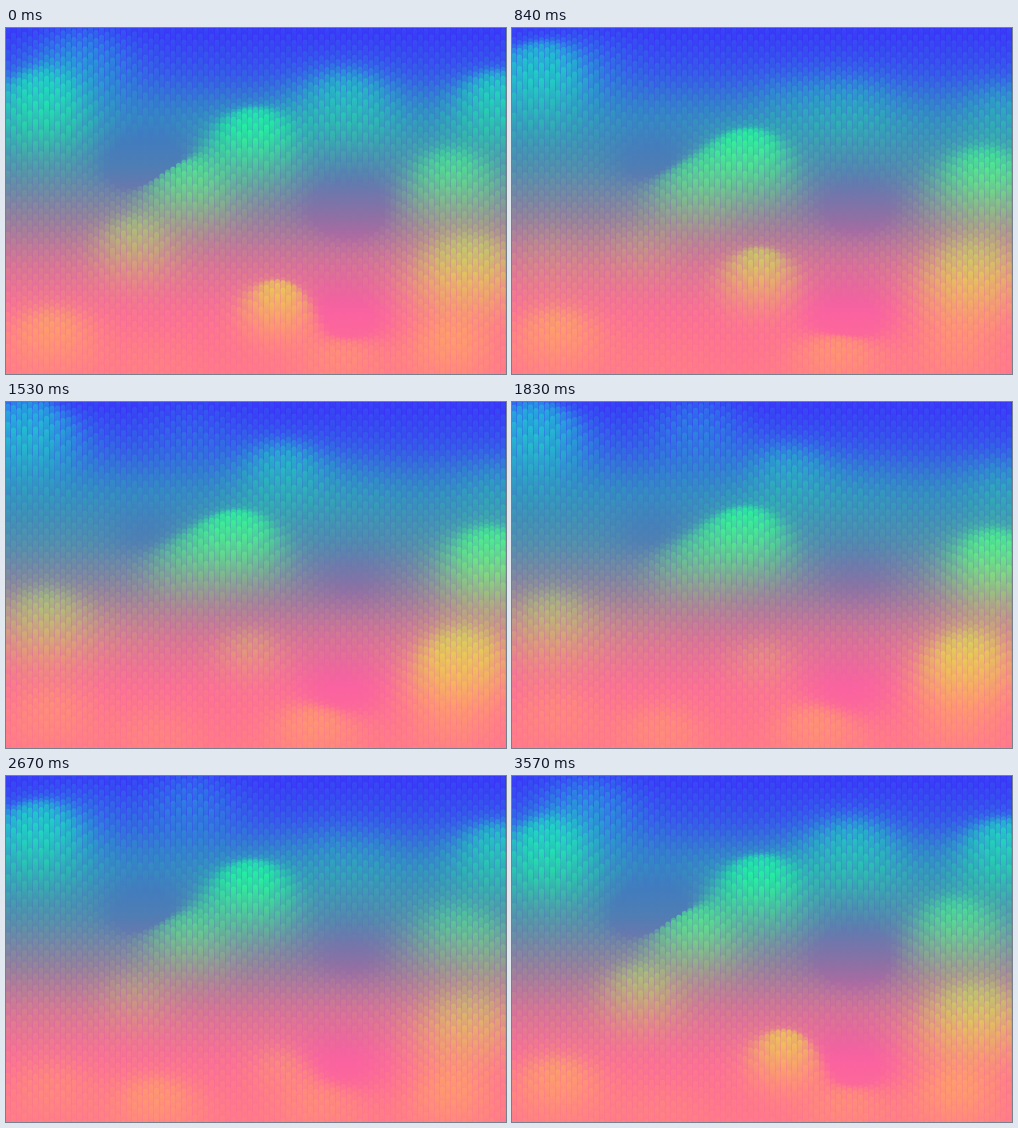
Animation, 500 px wide and 346 px high, one loop 3600 ms. Source, as an HTML page with a canvas:

```html
<!DOCTYPE html>
<html lang="en">
<head>
<meta charset="utf-8">
<title>Rolling pillars</title>
<style>
html, body { margin: 0; width: 100%; height: 100%; overflow: hidden; background: #3c28fa; }
canvas { display: block; width: 500px; height: 346px; }
</style>
</head>
<body>
<canvas id="stage" width="500" height="346"></canvas>
<script>
const W = 500, H = 346, LOOP = 3600, STEP = 30;
const COL = 5.5, ROW = 6, LIFT = 47, TAU = Math.PI * 2;
const ctx = document.getElementById('stage').getContext('2d');

// Hills and hollows: x, y, radius, strength, peak time, fade, drift x, drift y
const waves = [
  [28, 80, 42, 1.1, .7, 0, 8, 24],
  [75, 52, 50, .45, 0, 1],
  [241, 149, 38, 1.1, .15, 0, -8, 16],
  [184, 181, 42, .8, .02, .3],
  [130, 236, 38, .6, .97, 1],
  [492, 97, 42, 1, .9, .9],
  [462, 175, 45, .85, .15, .4, 20, 0],
  [340, 96, 50, .6, .03, 1],
  [275, 87, 42, .5, .42, 2],
  [185, 42, 45, .55, .62, 2],
  [262, 287, 33, 1.2, .1, 1, -20, -25],
  [462, 267, 52, .9, .05, .4],
  [452, 298, 40, 1, .45, 1.5],
  [487, 196, 40, .9, .48, 1.5],
  [40, 242, 48, .65, .44, 2],
  [45, 331, 45, .6, .12, .5],
  [320, 348, 45, .5, .3, .2, -15, 0],
  [150, 352, 45, .55, .68, 1],
  [445, 346, 42, .6, .9, .4],
  [140, 137, 40, -.6, .95, .6],
  [345, 178, 45, -.45, .05, .5],
  [335, 296, 45, -.4, .1, .3]
];

const ground = [
  [0, 60, 38, 252], [45, 58, 62, 242], [90, 55, 122, 200], [140, 78, 126, 180],
  [190, 142, 112, 164], [235, 212, 100, 160], [285, 250, 98, 160], [346, 255, 112, 146]
];
const glow = [
  [0, 38, 165, 225], [50, 32, 212, 196], [100, 34, 242, 160], [150, 92, 235, 138],
  [200, 172, 212, 112], [250, 230, 205, 86], [300, 255, 180, 88], [346, 255, 160, 105]
];

const mix = (a, b, k) => a.map((v, i) => v + (b[i] - v) * k);
const css = c => `rgb(${c.map(Math.round).join(',')})`;

function ramp(stops, y) {
  let i = 1;
  while (i < stops.length - 1 && stops[i][0] < y) i++;
  const a = stops[i - 1], b = stops[i];
  const k = Math.max(0, Math.min(1, (y - a[0]) / (b[0] - a[0])));
  return mix(a.slice(1), b.slice(1), k);
}

const table = stops => Array.from({ length: H + 1 }, (_, y) => ramp(stops, y));
const groundAt = table(ground), glowAt = table(glow);
const pick = (list, y) => list[Math.max(0, Math.min(H, Math.round(y)))];

function poseAt(t) {
  return waves.map(([x, y, r, a, peak, fade, vx = 0, vy = 0]) => {
    const p = TAU * (t - peak), s = Math.sin(p);
    return { x: x + vx * s, y: y + vy * s, q: 1 / (r * r), a: a * Math.exp(fade * (Math.cos(p) - 1)) };
  });
}

function heightAt(x, y, pose) {
  let sum = .2;
  for (const w of pose) {
    const dx = x - w.x, dy = (y - w.y) * 1.3;
    const d = (dx * dx + dy * dy) * w.q;
    if (d < 7) sum += w.a * Math.exp(-d);
  }
  return Math.tanh(Math.max(0, sum));
}

function pillar(x, y, h) {
  const top = y - h * LIFT, foot = y + 9;
  if (top > H + 4 || foot < -4) return;
  const fill = ctx.createLinearGradient(0, top - 2, 0, foot);
  fill.addColorStop(0, css(mix(pick(groundAt, top), pick(glowAt, top), Math.min(1, h * 1.2))));
  fill.addColorStop(1, css(pick(groundAt, foot)));
  ctx.strokeStyle = fill;
  ctx.beginPath();
  ctx.moveTo(x, top);
  ctx.lineTo(x, foot);
  ctx.stroke();
}

const sky = ctx.createLinearGradient(0, 0, 0, H);
for (const [y, ...c] of ground) sky.addColorStop(y / H, css(c));

function draw(t) {
  const pose = poseAt(t);
  ctx.fillStyle = sky;
  ctx.fillRect(0, 0, W, H);
  ctx.lineWidth = 5;
  ctx.lineCap = 'round';
  for (let j = 0, y = -12; y < H + LIFT; j++, y += ROW) {
    for (let x = 2 + (j % 2) * COL; x < W + COL; x += COL * 2) {
      pillar(x, y, heightAt(x, y, pose));
    }
  }
}

let last = -1;
function tick() {
  const n = Math.floor(performance.now() % LOOP / STEP);
  if (n !== last) draw((last = n) * STEP / LOOP);
  requestAnimationFrame(tick);
}
tick();
</script>
</body>
</html>
```
